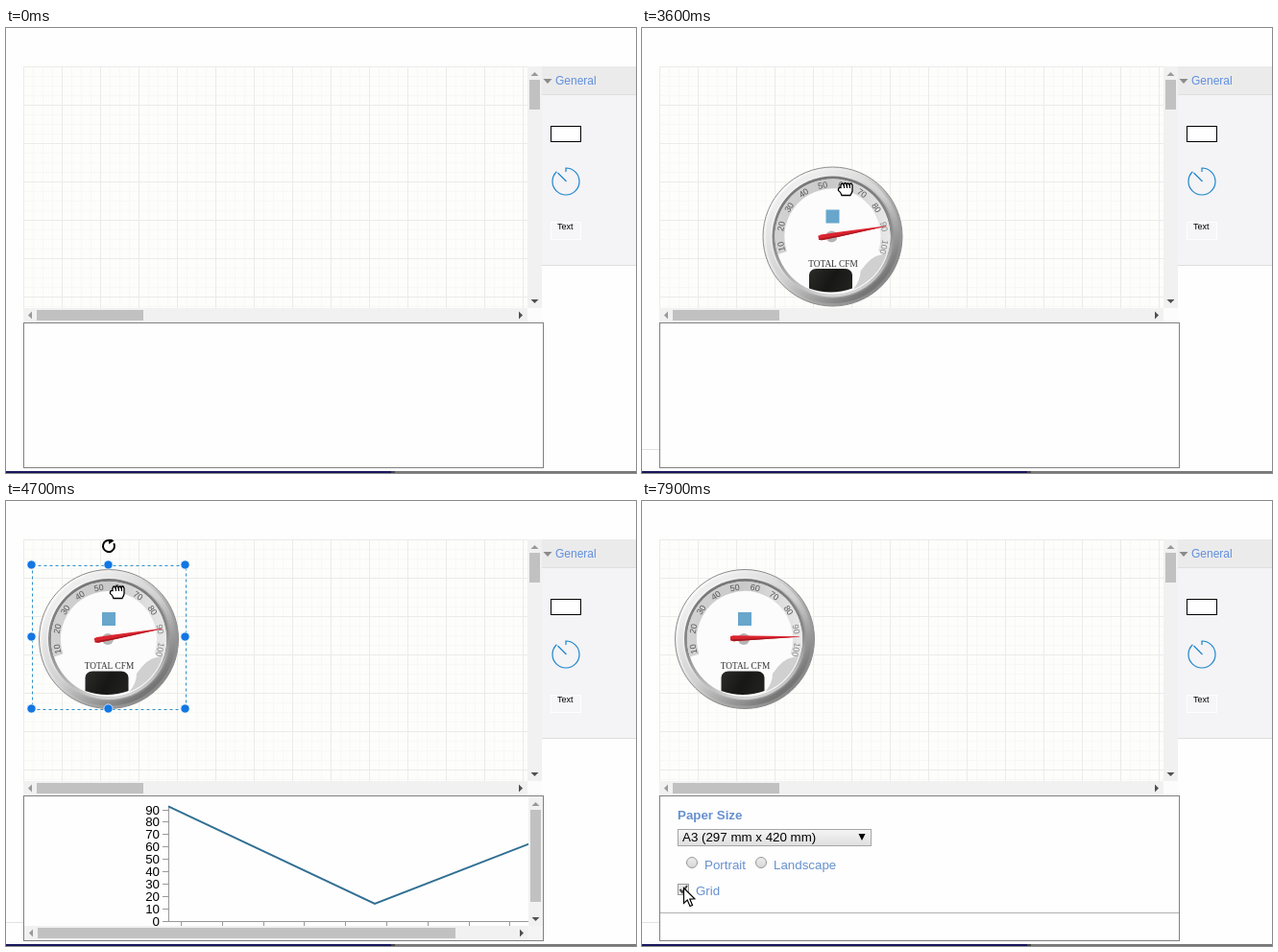
An HTML page with a canvas that plays this animation: 656x464 px, repeating every 8000 ms.

```html
<!DOCTYPE html>
<html lang="en">
<head>
<meta charset="utf-8">
<title>Gauge editor</title>
<style>
html, body { margin: 0; width: 100%; height: 100%; overflow: hidden; background: #fefefe; }
canvas { display: block; }
</style>
</head>
<body>
<canvas id="stage" width="656" height="464"></canvas>
<script>
const ctx = document.getElementById('stage').getContext('2d');
const LOOP = 8000, STEP = 100;
const SANS = '"Liberation Sans", Arial, sans-serif';
const SERIF = '"Liberation Serif", "Times New Roman", serif';
const BLUE = '#6790cf';

// Motion tracks: [time, ...values]
const POINTER = [
  [500, 652, 137], [900, 608, 141], [1100, 590, 152], [1600, 590, 152],
  [2200, 464, 153], [2500, 430, 154], [2700, 430, 154], [3400, 212, 168],
  [3700, 212, 168], [4200, 143, 111], [4400, 116, 95], [5200, 116, 95],
  [5800, 328, 175], [6000, 365, 181], [6200, 382, 200], [7000, 360, 404],
  [7400, 200, 410], [7800, 43, 403]
];
const GAUGE = [[3600, 198.5, 217.5], [4200, 134, 159.5], [4400, 107, 144]];
const NEEDLE = [
  [1500, 10], [2100, 76], [2600, 76], [3300, 10], [4700, 10], [5400, 33.7],
  [6200, 33.7], [6600, 63], [7000, 63], [7600, 1.5]
];
const DATA = [92.5, 14, 78.5, 56];

function sample(track, t) {
  if (t <= track[0][0]) return track[0].slice(1);
  for (let i = 1; i < track.length; i++) {
    const a = track[i - 1], b = track[i];
    if (t < b[0]) {
      const k = (t - a[0]) / (b[0] - a[0]);
      return a.slice(1).map((v, j) => v + (b[j + 1] - v) * k);
    }
  }
  return track[track.length - 1].slice(1);
}

function box(x, y, w, h, color) {
  ctx.fillStyle = color;
  ctx.fillRect(x, y, w, h);
}

function frame(x, y, w, h, color) {
  ctx.strokeStyle = color;
  ctx.lineWidth = 1;
  ctx.strokeRect(x + .5, y + .5, w - 1, h - 1);
}

function poly(points, fill, stroke, width = 1, close = true) {
  ctx.beginPath();
  points.forEach(([x, y]) => ctx.lineTo(x, y));
  if (close) ctx.closePath();
  if (fill) { ctx.fillStyle = fill; ctx.fill(); }
  if (stroke) { ctx.strokeStyle = stroke; ctx.lineWidth = width; ctx.stroke(); }
}

function disc(x, y, r, fill, stroke, width = 1) {
  ctx.beginPath();
  ctx.arc(x, y, r, 0, Math.PI * 2);
  if (fill) { ctx.fillStyle = fill; ctx.fill(); }
  if (stroke) { ctx.strokeStyle = stroke; ctx.lineWidth = width; ctx.stroke(); }
}

function label(str, x, y, font, color, align = 'left') {
  ctx.font = font;
  ctx.fillStyle = color;
  ctx.textAlign = align;
  ctx.fillText(str, x, y);
}

function clipped(x, y, w, h, draw) {
  ctx.save();
  ctx.beginPath();
  ctx.rect(x, y, w, h);
  ctx.clip();
  draw();
  ctx.restore();
}

function blend(x0, y0, x1, y1, ...stops) {
  const g = ctx.createLinearGradient(x0, y0, x1, y1);
  stops.forEach((c, i) => g.addColorStop(i / (stops.length - 1), c));
  return g;
}

function arrow(x, y, turn, color) {
  ctx.save();
  ctx.translate(x, y);
  ctx.rotate(turn * Math.PI / 2);
  poly([[-4, 2], [0, -2], [4, 2]], color);
  ctx.restore();
}

function vScroll(x, y, h, from, to) {
  box(x, y, 15, h, '#f1f1f1');
  box(x + 2, from, 11, to - from, '#c1c1c1');
  arrow(x + 7.5, y + 8, 0, '#999');
  arrow(x + 7.5, y + h - 7, 2, '#505050');
}

function hScroll(x, y, w, from, to) {
  box(x, y, w, 15, '#f1f1f1');
  box(from, y + 2, to - from, 11, '#c1c1c1');
  arrow(x + 7, y + 7.5, 3, '#999');
  arrow(x + w - 7, y + 7.5, 1, '#505050');
}

function drawGrid() {
  box(18, 40, 525, 252, '#fdfefb');
  for (const [gap, color] of [[10, '#f8f9f6'], [40, '#ebece8']]) {
    for (let x = 18; x < 543; x += gap) box(x, 40, 1, 252, color);
    for (let y = 40; y < 292; y += gap) box(18, y, 525, 1, color);
  }
}

function drawSidebar() {
  box(558, 40, 98, 208, '#f4f3f6');
  box(558, 40, 98, 29, '#ebebec');
  box(558, 69, 98, 1, '#dfdfe0');
  box(558, 247, 98, 1, '#dedee0');
  poly([[559.5, 53], [568.5, 53], [564, 58]], '#8b8b8b');
  label('General', 572, 59, '12px ' + SANS, '#628fdc');

  box(567, 102, 32, 17, '#fff');
  frame(567, 102, 32, 17, '#000');

  ctx.strokeStyle = '#1c87c9';
  ctx.lineWidth = 1.2;
  ctx.beginPath();
  ctx.moveTo(583, 150);
  ctx.lineTo(583, 146);
  ctx.arc(583, 160, 14, -Math.PI / 2, Math.PI * 1.26);
  ctx.moveTo(574.5, 151);
  ctx.lineTo(583.5, 160);
  ctx.stroke();

  box(567, 202, 32, 18, '#f6f5f7');
  frame(567, 202, 32, 19, '#fdfdfd');
  label('Text', 574, 210, '9px ' + SANS, '#000');
}

function drawNeedle(deg) {
  ctx.save();
  ctx.translate(-1, -1);
  disc(0, 1, 6, '#b4b4b4');
  ctx.rotate(-deg * Math.PI / 180);
  poly([[-14, -2.2], [-11, -3], [8, -2.3], [58, -.3], [58, .3], [8, 2.3], [-11, 3], [-14, 2.2]], '#dc2430');
  poly([[-14, 1], [58, 0], [8, 2.3], [-11, 3]], '#a81820');
  ctx.restore();
}

function drawGauge(x, y, deg) {
  ctx.save();
  ctx.translate(x, y);
  disc(0, 0, 72.5, blend(-55, -50, 60, 45, '#fafafa', '#e4e4e4', '#aaa', '#858585'), '#8c8c8c');
  disc(0, 0, 67, null, blend(-40, -50, 45, 50, '#eee', '#d0d0d0', '#757575'), 5);
  disc(0, 0, 63, blend(0, -63, 20, 63, '#777', '#8a8a8a', '#d8d8d8'));
  disc(0, 0, 60, '#fcfcfc');

  // Shaded scale band, fading toward the right
  ctx.beginPath();
  ctx.arc(0, 0, 55, Math.PI * .9, Math.PI * 2.1);
  ctx.strokeStyle = blend(-60, 0, 60, 0, '#d2d2d2', '#c9c9c9', '#e9e9e9');
  ctx.lineWidth = 10;
  ctx.stroke();

  ctx.beginPath();
  ctx.arc(0, 0, 59, .3, 1.2);
  ctx.quadraticCurveTo(29, 46, 29, 36);
  ctx.quadraticCurveTo(40, 20, 50, 19);
  ctx.closePath();
  ctx.fillStyle = '#d0d0d0';
  ctx.fill();

  for (let v = 10; v <= 100; v += 10) {
    ctx.save();
    ctx.rotate((-101 + (v - 10) * 2.25) * Math.PI / 180);
    label(String(v), 0, -51.5, '9px ' + SANS, v < 85 ? '#555' : '#858585', 'center');
    ctx.restore();
  }

  box(-7, -28, 14, 14, '#68a6cc');
  label('TOTAL CFM', .5, 31, '9.3px ' + SERIF, '#333', 'center');

  ctx.beginPath();
  ctx.moveTo(-24.5, 54);
  ctx.lineTo(-24.5, 40);
  ctx.quadraticCurveTo(-24, 34, -17, 33.5);
  ctx.lineTo(13, 33.5);
  ctx.quadraticCurveTo(20, 34, 20.5, 40);
  ctx.lineTo(20.5, 54);
  ctx.quadraticCurveTo(-2, 62, -24.5, 54);
  ctx.fillStyle = blend(-24, 34, 20, 58, '#2b2b29', '#171716', '#242422');
  ctx.fill();

  drawNeedle(deg);
  ctx.restore();
}

function drawSelection(x, y) {
  const cx = x - .5, cy = y - 2.5;
  ctx.setLineDash([3, 3]);
  ctx.strokeStyle = '#2f8fca';
  ctx.lineWidth = 1;
  ctx.strokeRect(Math.round(cx - 80) + .5, Math.round(cy - 75) + .5, 160, 150);
  ctx.setLineDash([]);
  for (const i of [-1, 0, 1]) {
    for (const j of [-1, 0, 1]) {
      if (i || j) disc(cx + i * 80, cy + j * 75, 4.6, '#1277e4', '#f4f8fc', .8);
    }
  }
  const ry = y - 97;
  ctx.beginPath();
  ctx.arc(x, ry, 6, -.5, Math.PI * 1.5);
  ctx.strokeStyle = '#000';
  ctx.lineWidth = 2;
  ctx.stroke();
  poly([[x, ry - 9], [x + 5.5, ry - 5.5], [x, ry - 2]], '#000');
}

function drawChart(count) {
  const left = 169, base = 438, gap = 430 / (count - 1);
  const py = v => base - v * 1.294;
  clipped(19, 308, 525, 135, () => {
    box(169, 318, 1, 121, '#999');
    box(169, 438, 400, 1, '#999');
    for (let v = 0; v <= 90; v += 10) {
      const y = Math.round(py(v));
      box(163, y, 6, 1, '#999');
      label(String(v), 160, y + 4.5, '13.33px ' + SANS, '#000', 'right');
    }
    const [first, step] = count === 3 ? [182, 42.8] : [234, 70.3];
    for (let x = first; x < 560; x += step) box(Math.round(x), 438, 1, 6, '#999');
    const line = DATA.slice(0, count).map((v, i) => [left + i * gap, py(v)]);
    poly(line, null, '#316f93', 2, false);
  });
  vScroll(544, 308, 135, 322, 418);
  hScroll(19, 443, 525, 33, 468);
  box(544, 443, 15, 15, '#f4f4f4');
}

function drawPaperPanel() {
  const font = '13.33px ' + SANS;
  label('Paper Size', 37, 332, 'bold ' + font, BLUE);
  box(37, 342, 202, 18, blend(0, 342, 0, 360, '#f6f6f6', '#dedede'));
  frame(37, 342, 202, 18, '#a5a5a5');
  label('A3 (297 mm x 420 mm)', 42, 355, font, '#000');
  poly([[225.5, 347], [232.5, 347], [229, 354]], '#000');
  for (const [x, name] of [[52, 'Portrait'], [124, 'Landscape']]) {
    disc(x, 377, 5.5, blend(0, 371, 0, 383, '#eee', '#d6d6d6'), '#999');
    label(name, x + 13, 384, font, BLUE);
  }
  box(37, 399, 12, 12, '#e8e8e8');
  frame(37, 399, 12, 12, '#999');
  poly([[39.5, 405], [42, 408], [47, 401]], null, '#444', 2, false);
  label('Grid', 56, 411, font, BLUE);
  box(19, 429, 540, 1, '#b0b0b0');
}

function drawHand(x, y) {
  ctx.save();
  ctx.translate(Math.round(x), Math.round(y));
  ctx.beginPath();
  ctx.moveTo(-4, 6.5);
  ctx.quadraticCurveTo(-5, 3, -7.5, 1.5);
  ctx.quadraticCurveTo(-8, -2, -5, -1.5);
  ctx.lineTo(-5, -4);
  for (const kx of [-5, -2, 1, 4]) ctx.quadraticCurveTo(kx + 1.5, kx === -2 ? -9 : -8, kx + 3, -4);
  ctx.lineTo(7, 2);
  ctx.quadraticCurveTo(6.5, 4, 5, 6.5);
  ctx.closePath();
  ctx.fillStyle = '#fff';
  ctx.fill();
  ctx.strokeStyle = '#000';
  ctx.lineWidth = 1.3;
  ctx.stroke();
  for (const kx of [-2, 1, 4]) box(kx, -4, 1, 3, '#000');
  ctx.restore();
}

function drawPointer(x, y) {
  ctx.save();
  ctx.translate(Math.round(x) + .5, Math.round(y) + .5);
  poly([[0, 0], [0, 16], [3.7, 12.6], [6.5, 19], [9, 18], [6.3, 11.6], [11.3, 11.3]], '#fff', '#000', 1.2);
  ctx.restore();
}

function render(t) {
  const selected = t >= 3700 && t < 5900;
  const [gx, gy] = sample(GAUGE, t);

  box(0, 0, 656, 464, '#fefefe');
  drawGrid();
  vScroll(543, 40, 252, 54, 85);
  hScroll(18, 292, 525, 32, 143);
  box(543, 292, 15, 15, '#fcfcfc');
  drawSidebar();

  if (t >= 1400) {
    clipped(18, 40, 525, 252, () => {
      drawGauge(gx, gy, sample(NEEDLE, t)[0]);
      if (selected) drawSelection(gx, gy);
    });
  }

  box(18, 307, 542, 152, '#fefefe');
  if (selected) drawChart(t < 5000 ? 3 : 4);
  if (t >= 5900) drawPaperPanel();
  frame(18, 307, 542, 152, '#808080');

  if (t >= 1400 && t < 2600) {
    box(0, 439, 98, 21, '#fefefe');
    box(0, 439, 97, 1, '#ddd');
    box(97, 440, 1, 20, '#ddd');
  } else if (t >= 2600) {
    box(0, 439, 18, 1, '#e2e2e2');
  }

  box(0, 462, 401, 2, '#17175c');
  box(401, 462, 4, 2, '#444');
  box(405, 462, 251, 2, '#777');

  if (t >= 500) {
    const [x, y] = sample(POINTER, t);
    const hand = (t >= 1000 && t < 1900) || (t >= 3100 && t < 5400);
    (hand ? drawHand : drawPointer)(x, y);
  }
}

const start = performance.now();
function tick() {
  const t = Math.max(0, performance.now() - start) % LOOP;
  render(Math.floor(t / STEP) * STEP);
  requestAnimationFrame(tick);
}
tick();
</script>
</body>
</html>
```
